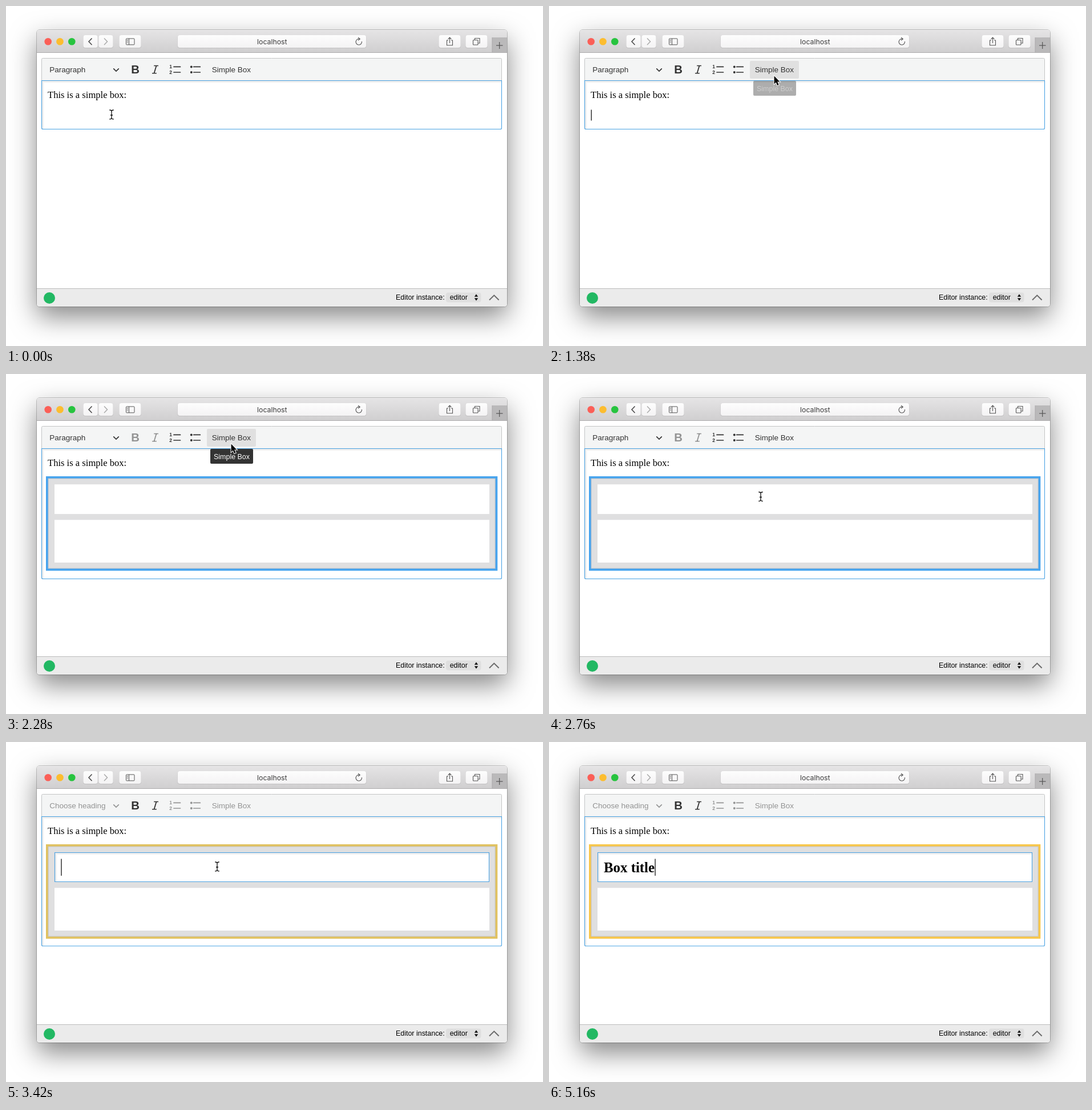
Animation, 941 px wide and 595 px high, one loop 5.52 s. Source, as an HTML page with a canvas:

```html
<!DOCTYPE html>
<html lang="en">
<head>
<meta charset="utf-8">
<title>Simple box</title>
<style>
html, body { margin: 0; width: 100%; height: 100%; overflow: hidden; background: #fff; }
canvas { display: block; width: 941px; height: 595px; }
</style>
</head>
<body>
<canvas id="stage"></canvas>
<script>
const W = 941, H = 595, LOOP = 5520, STEP = 60;
const canvas = document.getElementById('stage');
const ctx = canvas.getContext('2d');
const dpr = window.devicePixelRatio || 1;
canvas.width = W * dpr;
canvas.height = H * dpr;

const SANS = '"Liberation Sans", Arial, sans-serif';
const SERIF = '"Liberation Serif", "Times New Roman", serif';
const UI = 'Inter, sans-serif';
const INK = '#333', FOCUS = '#4ba3e3';
const SELECTED = [71, 164, 238], HOVER = [248, 199, 75];

// Event times in ms
const INSERT = 2280, CLICK = 3300, NESTED = 3360;
const KEYS = [3900, 4080, 4320, 4500, 4740, 4860, 4920, 5040, 5160];
const TITLE = 'Box title';
const PATH = [
  [420, 185, 190], [960, 387, 145], [1020, 389, 138], [1140, 393, 126], [1260, 394, 122],
  [2400, 394, 122], [2760, 371, 214.5], [2880, 371, 214.5], [3060, 370, 218]
];

const clamp = v => Math.max(0, Math.min(1, v));
const ramp = (t, a, b) => clamp((t - a) / (b - a));
const smooth = p => p * p * (3 - 2 * p);
const lerp = (a, b, p) => a + (b - a) * p;
const blink = (t, start) => t >= start && (t - start) % 900 < 500;

function pointerAt(t) {
  let i = 0;
  while (i < PATH.length - 2 && t >= PATH[i + 1][0]) i++;
  const [t0, x0, y0] = PATH[i], [t1, x1, y1] = PATH[i + 1];
  let p = ramp(t, t0, t1);
  if (t1 - t0 > 200) p = smooth(p);
  return { x: lerp(x0, x1, p), y: lerp(y0, y1, p) };
}

function rect(x, y, w, h, fill) {
  ctx.fillStyle = fill;
  ctx.fillRect(x, y, w, h);
}

function round(x, y, w, h, r, fill, stroke, width = 1) {
  ctx.beginPath();
  ctx.roundRect(x, y, w, h, r);
  if (fill) { ctx.fillStyle = fill; ctx.fill(); }
  if (stroke) { ctx.strokeStyle = stroke; ctx.lineWidth = width; ctx.stroke(); }
}

function line(points, color, width = 1, cap = 'butt') {
  ctx.beginPath();
  points.forEach(([x, y], i) => i ? ctx.lineTo(x, y) : ctx.moveTo(x, y));
  ctx.strokeStyle = color;
  ctx.lineWidth = width;
  ctx.lineCap = cap;
  ctx.lineJoin = 'miter';
  ctx.stroke();
}

function poly(points, fill) {
  ctx.beginPath();
  points.forEach(([x, y]) => ctx.lineTo(x, y));
  ctx.closePath();
  ctx.fillStyle = fill;
  ctx.fill();
}

function disc(x, y, r, fill) {
  ctx.beginPath();
  ctx.arc(x, y, r, 0, Math.PI * 2);
  ctx.fillStyle = fill;
  ctx.fill();
}

function text(str, x, y, font, color, align = 'left') {
  ctx.font = font;
  ctx.textAlign = align;
  ctx.fillStyle = color;
  ctx.fillText(str, x, y);
}

function gradient(y0, y1, from, to) {
  const g = ctx.createLinearGradient(0, y0, 0, y1);
  g.addColorStop(0, from);
  g.addColorStop(1, to);
  return g;
}

function faded(alpha, draw) {
  ctx.save();
  ctx.globalAlpha *= alpha;
  draw();
  ctx.restore();
}

function barButton(x, w) {
  round(x, 51.5, w, 22.5, 4, '#c3c2c3');
  round(x + .4, 51, w - .8, 22, 4, gradient(51, 73, '#fdfdfd', '#f4f3f4'));
}

function drawWindow() {
  ctx.save();
  ctx.shadowColor = 'rgba(0,0,0,.47)';
  ctx.shadowBlur = 46 * dpr;
  ctx.shadowOffsetY = 18 * dpr;
  round(54, 42, 824, 484, 5, '#fff');
  ctx.restore();
  round(53.5, 41.5, 825, 485, 5.5, null, 'rgba(0,0,0,.22)');

  ctx.save();
  ctx.beginPath();
  ctx.roundRect(54, 42, 824, 484, 5);
  ctx.clip();
  rect(54, 42, 824, 484, '#fff');
  rect(54, 42, 824, 39, gradient(42, 81, '#e5e4e5', '#d0cfd0'));
  rect(54, 42, 824, 1, '#f2f1f2');
  rect(852, 55, 26, 26, '#bab9ba');
  rect(851.5, 55, 1, 26, '#a9a8a9');
  rect(54, 81, 824, 1, '#adacad');
  rect(54, 494, 824, 32, '#ebebeb');
  rect(54, 494, 824, 1, '#bcbcbc');
  ctx.restore();
}

function drawTitleBar() {
  ['#fb5f57', '#fcbd2f', '#27c43f'].forEach((c, i) => disc(73.7 + i * 20.8, 62.3, 6.3, c));
  barButton(135, 26);
  barButton(162, 26);
  barButton(198, 39);
  barButton(300.5, 331);
  barButton(758, 39);
  barButton(805, 39);
  line([[150.5, 56.5], [145, 62.3], [150.5, 68]], '#444', 1.5);
  line([[172, 56.5], [177.5, 62.3], [172, 68]], '#aaa', 1.5);

  round(210.5, 57, 14.5, 10.8, 1, null, '#555');
  line([[215.5, 57], [215.5, 68]], '#555');
  for (let y = 59.5; y < 65; y += 2.2) line([[212, y], [214, y]], '#555', .9);

  text('localhost', 466.3, 67, '12.3px ' + UI, '#3c3c3c', 'center');

  ctx.beginPath();
  ctx.arc(618.3, 62.8, 5.2, -.15, Math.PI * 1.62);
  ctx.strokeStyle = '#555';
  ctx.lineWidth = 1.1;
  ctx.stroke();
  line([[617, 54.8], [620.3, 57.8], [617, 60.4]], '#555', 1.1);

  line([[775, 60], [772.5, 60], [772.5, 68.7], [782.5, 68.7], [782.5, 60], [780, 60]], '#555', 1.1);
  line([[777.5, 65], [777.5, 55.5]], '#555', 1.1);
  line([[774.7, 58], [777.5, 55], [780.3, 58]], '#555', 1.1);

  round(818.5, 59.5, 8.5, 8.5, 1, null, '#555', 1.1);
  line([[821.5, 59], [821.5, 56.5], [830, 56.5], [830, 65], [827.5, 65]], '#555', 1.1);

  line([[859, 69], [870.5, 69]], '#555', 1.2);
  line([[864.7, 63], [864.7, 75]], '#555', 1.2);
}

function drawStatusBar() {
  disc(76, 511, 10, '#22b863');
  text('Editor instance:', 683, 514.3, '12.45px ' + SANS, '#000');
  round(771, 501.5, 61.5, 17, 4, '#dfdfdf');
  text('editor', 777.7, 514.3, '12.45px ' + SANS, '#000');
  poly([[820.8, 508.8], [824, 504.3], [827.2, 508.8]], '#111');
  poly([[820.8, 511.3], [824, 515.8], [827.2, 511.3]], '#111');
  line([[847, 514.5], [855.3, 506.3], [863.6, 514.5]], '#6b6b6b', 2);
}

function listLines(x) {
  for (const y of [106.4, 116]) line([[x, y], [x + 11.5, y]], INK, 1.7, 'round');
}

function drawToolbar(t, hover) {
  const inTitle = t >= NESTED;
  const styles = t >= INSERT && !inTitle ? .5 : 1;
  const blocks = inTitle ? .5 : 1;
  const font = '13.5px ' + SANS;

  round(62.5, 91.5, 806, 39, [2, 2, 0, 0], '#f4f5f5', '#c3c4c5');
  if (hover) round(352, 96, 86, 31, 2, '#e0e0e0');

  faded(blocks, () => {
    text(inTitle ? 'Choose heading' : 'Paragraph', 76.2, 116.2, font, INK);
    line([[188.7, 109.8], [193, 114], [197.3, 109.8]], INK, 1.7, 'round');
    text('1', 286.3, 109.3, 'bold 8.5px ' + SANS, INK);
    text('2', 286.3, 119.3, 'bold 8.5px ' + SANS, INK);
    listLines(294);
    disc(324.8, 106.4, 2, INK);
    disc(324.8, 116, 2, INK);
    listLines(328.8);
    text('Simple Box', 360.8, 115.8, font, INK);
  });
  faded(styles, () => {
    text('B', 219.2, 118, 'bold 20.3px ' + SANS, INK);
    line([[259.2, 104.5], [267, 104.5]], INK, 1.5);
    line([[256, 117.7], [263.8, 117.7]], INK, 1.5);
    line([[263.5, 104.5], [259.5, 117.7]], INK, 1.8);
  });
}

// White field with a focus border and a soft inner shadow
function focusField(x, y, w, h, r) {
  round(x, y, w, h, r, '#fff');
  for (let i = 0; i < 4; i++) {
    const shade = `rgba(0,0,0,${.085 - i * .022})`;
    rect(x + 1 + i, y + 1 + i, w - 2 - i, 1, shade);
    rect(x + 1 + i, y + 2 + i, 1, h - 3 - i, shade);
  }
  round(x + .5, y + .5, w - 1, h - 1, r, null, FOCUS, 1.1);
}

function drawWidget(t) {
  const p = ramp(t, 3320, 3476);
  const mix = 1 - (1 - p) ** 2;
  const outline = SELECTED.map((c, i) => Math.round(lerp(c, HOVER[i], mix)));
  rect(70, 179, 791.3, 165.3, `rgb(${outline})`);
  rect(73.6, 182.6, 784, 158, '#c3c4c8');
  rect(74.6, 183.6, 782, 156, '#dfdfe0');
  rect(85, 255.3, 762, 74.7, '#fff');

  if (t < CLICK) {
    rect(85, 193.2, 762, 51.8, '#fff');
    return;
  }
  focusField(85, 193, 762, 52, 0);
  const typed = TITLE.slice(0, KEYS.filter(k => t >= k).length);
  text(typed, 96, 227.5, 'bold 24.87px ' + SERIF, '#000');
  if (typed || blink(t, CLICK)) {
    rect(96.4 + ctx.measureText(typed).width, 204.5, 1.2, 29.5, '#000');
  }
}

function drawEditor(t) {
  const bottom = t < INSERT ? 216 : t < NESTED ? 359 : 357.5;
  focusField(62, 130, 807, bottom - 130, [0, 0, 2, 2]);
  text('This is a simple box:', 73, 161, '16.58px ' + SERIF, '#000');
  if (t >= INSERT) drawWidget(t);
  else if (blink(t, 60)) rect(73.6, 181.5, 1.2, 19, '#000');
}

function drawTooltip(t) {
  const alpha = ramp(t, 1300, 1500) * (1 - ramp(t, 2420, 2640));
  if (!alpha) return;
  faded(alpha, () => {
    round(358, 131, 75, 26, 2, '#333');
    text('Simple Box', 395.5, 148.7, '12.45px ' + SANS, '#fff', 'center');
  });
}

function drawArrow(x, y) {
  ctx.save();
  ctx.translate(x, y);
  ctx.beginPath();
  [[.6, .6], [.6, 14.4], [3.8, 11.4], [6.2, 17], [8.6, 16], [6.2, 10.6], [10.4, 10.6]]
    .forEach(([px, py]) => ctx.lineTo(px, py));
  ctx.closePath();
  ctx.strokeStyle = '#fff';
  ctx.lineWidth = 2;
  ctx.stroke();
  ctx.fillStyle = '#000';
  ctx.fill();
  ctx.restore();
}

function drawBeam(x, y) {
  const stroke = (color, width) => {
    ctx.beginPath();
    for (const s of [-1, 1]) {
      ctx.moveTo(x - 3.7, y + s * 8);
      ctx.quadraticCurveTo(x, y + s * 8, x, y + s * 5.5);
      ctx.quadraticCurveTo(x, y + s * 8, x + 3.7, y + s * 8);
    }
    ctx.moveTo(x, y - 6);
    ctx.lineTo(x, y + 6);
    ctx.moveTo(x - 2, y + 1);
    ctx.lineTo(x + 2, y + 1);
    ctx.strokeStyle = color;
    ctx.lineWidth = width;
    ctx.stroke();
  };
  stroke('rgba(255,255,255,.8)', 3);
  stroke('#111', 1.3);
}

function draw(t) {
  const { x, y } = pointerAt(t);
  const onFrame = t >= INSERT && y > 179 && y < 193;
  ctx.setTransform(dpr, 0, 0, dpr, 0, 0);
  rect(0, 0, W, H, '#fff');
  drawWindow();
  drawTitleBar();
  drawStatusBar();
  drawToolbar(t, y < 127);
  drawEditor(t);
  drawTooltip(t);
  if (t >= KEYS[0]) return;
  if (y < 131 || onFrame) drawArrow(x, y);
  else drawBeam(x, y);
}

function tick() {
  const t = performance.now() % LOOP;
  draw(Math.floor(t / STEP) * STEP);
  requestAnimationFrame(tick);
}
tick();
</script>
</body>
</html>
```
